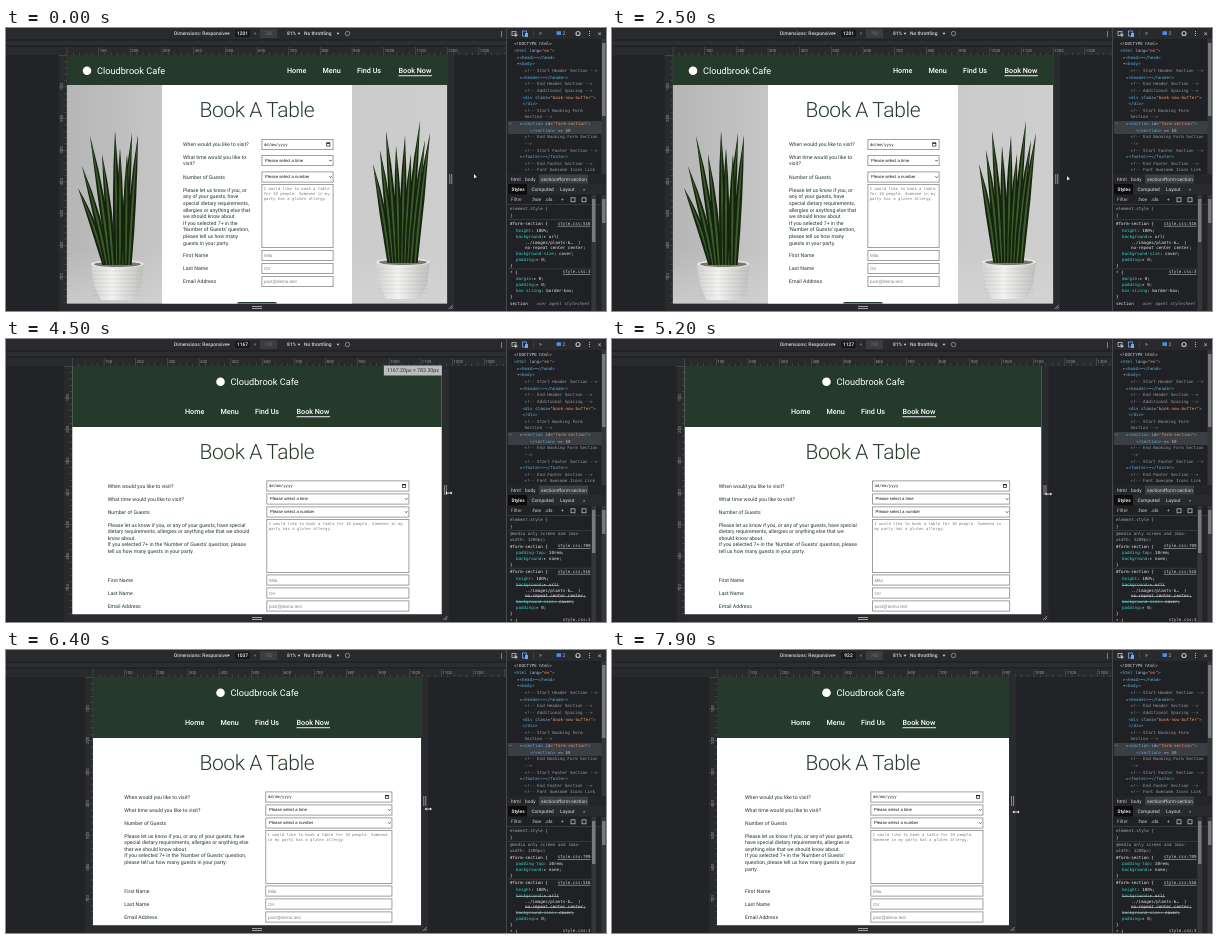
Recreate the animation shown at these times as an HTML page with a canvas. Size 600 px wide and 283 px high, loop 8000 ms.

```html
<!DOCTYPE html>
<html lang="en">
<head>
<meta charset="utf-8">
<title>Responsive booking form</title>
<style>
  html, body { margin: 0; width: 100%; height: 100%; overflow: hidden; background: #202124; }
  canvas { display: block; }
</style>
</head>
<body>
<canvas id="stage" width="600" height="283"></canvas>
<script>
const g = document.getElementById('stage').getContext('2d');
const LOOP = 8000, SCALE = 0.3168, MID = 251, TOP = 27, BOTTOM = 275.5;
const SITE = 'Roboto, sans-serif', UI = 'Roboto, sans-serif';
const ARIAL = '"Liberation Sans", sans-serif', MONO = '"DejaVu Sans Mono", monospace';
const GREEN = '#253a2a', CH = 2.53;

const WIDTHS = [[3600, 1201], [4500, 1167], [5800, 1092], [6400, 1037], [7900, 922], [8000, 915]];
const POINTER_X = [[0, 469], [1400, 464], [3600, 448]];
const POINTER_Y = [[0, 148], [1400, 147], [3600, 153], [4500, 154], [5800, 156], [6400, 159], [7900, 162]];

const NOTE = "Please let us know if you, or any of your guests, have special dietary requirements, " +
  "allergies or anything else that we should know about.\n" +
  "If you selected 7+ in the 'Number of Guests' question, please tell us how many guests in your party.";
const HINT = 'I would like to book a table for 10 people. Someone in my party has a gluten allergy.';

// Piecewise linear value of [time, value] keys
function at(keys, t) {
  if (t <= keys[0][0]) return keys[0][1];
  for (let i = 1; i < keys.length; i++) {
    const [a, u] = keys[i - 1], [b, v] = keys[i];
    if (t <= b) return u + (v - u) * (t - a) / (b - a);
  }
  return keys[keys.length - 1][1];
}

function rect(x, y, w, h, color) {
  g.fillStyle = color;
  g.fillRect(x, y, w, h);
}

function line(color, width, ...pts) {
  g.strokeStyle = color;
  g.lineWidth = width;
  g.beginPath();
  pts.forEach(([x, y]) => g.lineTo(x, y));
  g.stroke();
}

function shape(color, ...pts) {
  g.fillStyle = color;
  g.beginPath();
  pts.forEach(([x, y]) => g.lineTo(x, y));
  g.fill();
}

function oval(x, y, rx, ry, color) {
  g.fillStyle = color;
  g.beginPath();
  g.ellipse(x, y, rx, ry, 0, 0, 7);
  g.fill();
}

// y is the middle of the capitals
function text(s, x, y, size, color, family = SITE, align = 'left', style = '') {
  g.font = `${style} ${size}px ${family}`;
  g.textAlign = align;
  g.fillStyle = color;
  g.fillText(s, x, y + size * 0.35);
}

function wrap(s, limit) {
  return s.split('\n').flatMap(part => {
    const rows = [''];
    for (const word of part.split(' ')) {
      const row = rows[rows.length - 1];
      if (!row) rows[rows.length - 1] = word;
      else if (row.length + 1 + word.length <= limit) rows[rows.length - 1] += ' ' + word;
      else rows.push(word);
    }
    return rows;
  });
}

function chevron(x, y, color, r = 1.2) {
  line(color, 0.8, [x - r, y - r / 2], [x, y + r / 2], [x + r, y - r / 2]);
}

function toolbar(width) {
  rect(0, 0, 501, 283, '#222326');
  rect(0, 0, 501, 11, '#292a2d');
  rect(0, 13, 501, 4, '#2c2d30');
  const grey = '#d4d7da';
  const label = (s, x) => text(s, x, 5.5, 4.9, grey, UI, 'left', '500');
  label('Dimensions: Responsive', 168);
  label('81%', 281);
  label('No throttling', 298);
  [222.5, 293, 332].forEach(x => shape(grey, [x - 1.4, 4.8], [x + 1.4, 4.8], [x, 6.8]));
  rect(228, 1, 17, 9, '#3b3c40');
  rect(228.5, 1.5, 16, 8, '#18191b');
  rect(254, 1, 17, 9, '#3b3c40');
  text(width, 236.5, 5.5, 4.9, '#f1f3f4', UI, 'center', '500');
  text('×', 249, 5.5, 4.7, '#999', UI, 'center');
  text('783', 262.5, 5.5, 4.9, '#6a6c70', UI, 'center');
  g.strokeStyle = '#a9acaf';
  g.lineWidth = 0.7;
  g.beginPath();
  g.arc(341.5, 5.5, 2.2, 0, 7);
  g.stroke();
  [3.5, 5.5, 7.5].forEach(y => rect(495, y, 1, 1, grey));
}

function rulers(left) {
  rect(0, 19, 501, 8, '#292a2c');
  rect(left - 8, TOP, 8, 256, '#292a2c');
  for (let n = 0; left + n * SCALE < 501; n += 20) {
    const x = left + n * SCALE, big = n % 100 === 0;
    rect(x, big ? 19 : 24.5, 0.5, big ? 8 : 2.5, '#5b5d60');
    if (big && n) text(n, x + 1.2, 22.3, 4.2, '#929497', UI);
  }
  for (let n = 0; n < 800; n += 20) {
    const y = TOP + n * SCALE, big = n % 100 === 0;
    rect(left - (big ? 8 : 2.5), y, big ? 8 : 2.5, 0.5, '#5b5d60');
    if (!big || !n) continue;
    g.save();
    g.translate(left - 4.8, y - 1);
    g.rotate(-Math.PI / 2);
    text(n, -1, 0, 4.2, '#929497', UI, 'center');
    g.restore();
  }
}

function handles(right) {
  rect(right, TOP, 7, 256, '#2a2b2e');
  rect(MID * 2 - right, BOTTOM, (right - MID) * 2 + 7, 8, '#2a2b2e');
  [2, 4].forEach(d => rect(right + d, 146, 1, 10, '#8c8e91'));
  [278, 280].forEach(y => rect(MID - 5, y, 10, 1, '#a0a2a5'));
  line('#a0a2a5', 0.8, [right + 1.5, 281], [right + 5.5, 277]);
  line('#a0a2a5', 0.8, [right + 3.5, 281], [right + 5.5, 279]);
}

function leaf(x, y, tx, ty, w) {
  const bend = (tx - x) * 0.35, my = (y + ty) / 2;
  const blade = (half, color) => {
    g.fillStyle = color;
    g.beginPath();
    g.moveTo(x - half / 2, y);
    g.quadraticCurveTo(x + bend - half, my, tx, ty);
    g.quadraticCurveTo(x + bend + half, my, x + half / 2, y);
    g.fill();
  };
  blade(w, '#15240f');
  blade(w * 0.3, '#3d5c2a');
}

function pot(x, y, w, h) {
  const fill = g.createLinearGradient(x, 0, x + w, 0);
  fill.addColorStop(0, '#d2d2d0');
  fill.addColorStop(0.4, '#f2f2f0');
  fill.addColorStop(1, '#bebebc');
  shape(fill, [x, y], [x + w, y], [x + w - 3, y + h * 0.6], [x + w - 10, y + h],
    [x + 10, y + h], [x + 3, y + h * 0.6]);
  for (let d = 7; d < h - 3; d += 4) line('rgba(130,130,130,.2)', 0.6, [x + 2, y + d], [x + w - 2, y + d]);
  oval(x + w / 2, y, w / 2, 4, '#e6e6e4');
  oval(x + w / 2, y + 0.3, w / 2 - 3, 2.6, '#77776e');
}

function plants(left, right) {
  const wall = g.createLinearGradient(left, 0, right, 0);
  wall.addColorStop(0, '#b6b6b6');
  wall.addColorStop(0.25, '#c6c6c6');
  wall.addColorStop(1, '#cecece');
  rect(left, 57, right - left, BOTTOM - 57, wall);
  const table = g.createLinearGradient(0, 222, 0, BOTTOM);
  table.addColorStop(0, 'rgba(215,215,215,0)');
  table.addColorStop(1, 'rgba(215,215,215,.6)');
  rect(left, 222, right - left, 54, table);
  pot(85, 236, 53, 36);
  [[99, 72, 160], [101, 76, 138], [104, 84, 108], [107, 96, 126], [111, 109, 103],
   [114, 114, 120], [117, 126, 105], [120, 121, 126], [123, 132, 107]]
    .forEach(([x, tx, ty]) => leaf(x, 237, tx, ty, 5.2));
  pot(370, 234, 54, 37);
  [[384, 367, 136], [387, 374, 122], [390, 380, 103], [393, 390, 118], [396, 399, 108],
   [399, 405, 126], [402, 414, 93], [405, 419, 112], [409, 424, 105]]
    .forEach(([x, tx, ty]) => leaf(x, 235, tx, ty, 5.2));
}

function nav(logoX, logoY, linkX, linkY) {
  oval(logoX, logoY, 4.3, 4.3, '#fff');
  text('Cloudbrook Cafe', logoX + 10, logoY, 9.2, '#fff');
  ['Home', 'Menu', 'Find Us', 'Book Now'].forEach((s, i) =>
    text(s, linkX + [0, 35.5, 70, 111.5][i], linkY, 7.2, '#fff', SITE, 'left', '500'));
  rect(linkX + 111.5, linkY + 4.6, 33.5, 0.9, '#fff');
}

function form(wide, left, x, right) {
  const w = right - x;
  const y = wide ? [116.5, 132.5, 149, 227.5, 240.5, 253.5] : [147, 160, 173, 241, 254, 267];
  const area = wide ? [156, 64] : [180, 54];
  const ink = '#24382a';
  const label = (s, ly) => text(s, left, ly, 5.18, ink);
  const box = (by, h) => {
    rect(x, by, w, h, '#858a86');
    rect(x + 0.8, by + 0.8, w - 1.6, h - 1.6, '#fff');
  };

  label('When would you like to visit?', y[0]);
  if (wide) {
    label('What time would you like to', 129);
    label('visit?', 135.5);
  } else label('What time would you like to visit?', y[1]);
  label('Number of Guests', y[2]);
  const note = wide ? wrap(NOTE.replace('many ', 'many\n'), 31) : wrap(NOTE, Math.floor((244.5 - left) / 2.2));
  note.forEach((s, i) => label(s, (wide ? 162 : 185.7) + i * 6.6));

  y.forEach(cy => box(cy - 5.5, 11));
  text('dd/mm/yyyy', x + 2.5, y[0], 3.95, '#222', MONO);
  g.strokeStyle = '#222';
  g.lineWidth = 0.7;
  g.strokeRect(right - 6.8, y[0] - 1.6, 3.2, 3.2);
  rect(right - 7, y[0] - 1.9, 3.4, 1.2, '#222');
  ['Please select a time', 'Please select a number'].forEach((s, i) => {
    text(s, x + 3.5, y[i + 1], 4.25, '#111', ARIAL);
    chevron(right - 3, y[i + 1], '#222');
  });
  ['First Name', 'Last Name', 'Email Address'].forEach((s, i) => {
    label(s, y[i + 3]);
    text(['Mila', 'Orr', 'post@demo.test'][i], x + 2.5, y[i + 3], 4.5, '#808080', ARIAL);
  });
  box(...area);
  wrap(HINT, Math.floor((w - 4) / 2.36)).forEach((s, i) =>
    text(s, x + 2.2, area[0] + 5 + i * 5, 3.92, '#7c7c7c', MONO));
}

function page(wide, left, right) {
  const w = right - left;
  g.save();
  g.beginPath();
  g.rect(left, TOP, w, BOTTOM - TOP);
  g.clip();
  rect(left, TOP, w, BOTTOM - TOP, '#fff');
  if (wide) {
    plants(left, right);
    rect(156, 57, 190, 219, '#fff');
    rect(left, TOP, w, 30, GREEN);
    nav(81, 42.7, 281, 42.7);
    form(true, 177, 255.5, 327.5);
    g.fillStyle = GREEN;
    g.beginPath();
    g.roundRect(231, 274, 40, 10, 2);
    g.fill();
  } else {
    rect(left, TOP, w, 61, GREEN);
    nav(214.5, 42.7, 179, 72.7);
    form(false, left + w * 0.096, MID + w * 0.0255, right - w * 0.088);
  }
  g.letterSpacing = '-0.4px';
  text('Book A Table', MID - 0.2, wide ? 81.8 : 112.3, 21, GREEN, SITE, 'center', '300');
  g.letterSpacing = '0px';
  g.restore();
}

const MARKUP = [
  [508, '<!DOCTYPE html>'], [508, '<html lang="en">'], [511, '▸<head>⋯</head>'], [511, '▾<body>'],
  [518.5, '<!-- Start Header Section -->'], [514, '▸<header>⋯</header>'],
  [518.5, '<!-- End Header Section -->'], [518.5, '<!-- Additional Spacing -->'],
  [516.5, '<div class="book-now-buffer">'], [516.5, '</div>'],
  [518.5, '<!-- Start Booking Form'], [518.5, 'Section -->'],
  [514, '▸<section id="form-section">'], [524, '</section> == $0'],
  [518.5, '<!-- End Booking Form Section'], [518.5, '-->'],
  [518.5, '<!-- Start Footer Section -->'], [514, '▸<footer>⋯</footer>'],
  [518.5, '<!-- End Footer Section -->'], [518.5, '<!-- Font Awesome Icons Link']
];

function code(s, x, y, color, style) {
  text(s, x, y, 4.2, color, MONO, 'left', style);
}

function markup() {
  rect(502, 93, 94, 13, '#3b3e43');
  text('⋯', 503, 96, 4.2, '#aaa', MONO);
  MARKUP.forEach(([x, s], i) => {
    const y = 16 + i * 6.63;
    if (/--|^Section/.test(s)) return code(s, x, y, '#989a9c');
    if (/DOCTYPE/.test(s)) return code(s, x, y, '#d8dadc');
    for (const m of s.matchAll(/"[^"]*"|\w+(?==)|[▸▾⋯=]| ==.*|[^"▸▾⋯= ]+/g)) {
      const p = m[0];
      const color = p[0] === '"' ? '#f29766' : /^[▸▾⋯=]| ==/.test(p) ? '#b5b8bb'
        : s[m.index + p.length] === '=' ? '#9bbbdc' : '#5db0d7';
      code(p, x + m.index * CH, y, color);
    }
  });
}

// Rows: [y, text, flag]; flag is a link label or 'x' for an overridden rule
const BASE_RULE = [[0, '#form-section {', 'style.css:516'], [6.5, ' height: 100%;']];
const shift = (dy, rows) => rows.map(([y, ...rest]) => [y + dy, ...rest]);
const STYLES_WIDE = [
  ...shift(196, BASE_RULE), [209, ' background:▸ url('], [214.7, '   ../images/plants-b…  )'],
  [220, '   no-repeat center center;'], [226, ' background-size: cover;'], [231.7, ' padding:▸ 0;'], [237.5, '}'],
  [244.5, '* {', 'style.css:3'], [251, ' margin:▸ 0;'], [257, ' padding:▸ 0;'],
  [263, ' box-sizing: border-box;'], [269, '}'], [276, 'section']
];
const STYLES_NARROW = [
  [195, '@media only screen and (max-'], [201, 'width: 1200px)'],
  [207.5, '#form-section {', 'style.css:709'], [213.7, ' padding-top: 10rem;'], [219.5, ' background:▸ none;'], [225.5, '}'],
  ...shift(233, BASE_RULE), [246, ' background:▸ url(', 'x'], [251.5, '   ../images/plants-b…  )'],
  [257, '   no-repeat center center;', 'x'], [262.5, ' background-size: cover;', 'x'],
  [268.5, ' padding:▸ 0;'], [275, '}'], [281.5, '* {', 'style.css:3']
];

function styles(wide) {
  code('element.style {', 504, 181, '#a9acaf');
  code('}', 504, 187.7, '#c8cacc');
  rect(502, 191.5, 84, 0.5, '#4a4c50');
  rect(502, wide ? 240.7 : 228.9, 84, 0.5, '#4a4c50');
  for (const [y, s, flag] of wide ? STYLES_WIDE : STYLES_NARROW) {
    const body = s.trimStart(), indent = s.length - body.length;
    const x = 504 + (indent === 3 ? 15 : indent * 6);
    const cut = indent === 1 ? body.indexOf(':') : 0;
    code(body.slice(0, cut), x, y, '#35d4c7');
    code(body.slice(cut), x + cut * CH, y, s[0] === '@' || s[0] === 'w' ? '#a0a3a6' : '#e8eaed');
    if (flag === 'x') rect(x, y, body.length * CH, 0.6, '#c8cacc');
    else if (flag) {
      text(flag, 584.5, y - 0.5, 4.2, '#d0d3d6', MONO, 'right');
      rect(584.5 - flag.length * CH, y + 1.9, flag.length * CH, 0.5, '#d0d3d6');
    }
  }
  if (wide) text('user agent stylesheet', 583.5, 276, 4.2, '#9a9da0', MONO, 'right', 'italic');
}

function scrollbar(x, top, bottom, thumbTop, thumbEnd) {
  rect(x, top, 4.5, bottom - top, '#35363a');
  rect(x + 0.5, thumbTop, 3.5, thumbEnd - thumbTop, '#77797c');
}

function inspector(wide) {
  const grey = '#b9bcbf';
  rect(500, 0, 100, 283, '#202124');
  rect(500, 0, 1, 283, '#46484c');
  rect(501, 0, 99, 11, '#292a2d');
  g.lineWidth = 0.8;
  g.strokeStyle = grey;
  g.strokeRect(506, 3.5, 4, 4);
  shape(grey, [508, 5], [512, 7], [509.5, 9]);
  g.strokeStyle = '#6ea8f0';
  g.strokeRect(516.5, 3, 4, 5);
  rect(519, 5, 3, 4, '#6ea8f0');
  rect(527, 2.5, 0.5, 6, '#55585c');
  text('»', 534.5, 5.3, 6, grey, UI, 'center');
  rect(550.5, 3.3, 4.5, 3.6, '#4f8fe8');
  text('2', 556.5, 5.3, 4.9, grey, UI);
  g.beginPath();
  g.arc(572, 5.5, 2, 0, 7);
  g.lineWidth = 1.2;
  g.strokeStyle = grey;
  g.stroke();
  [3, 5, 7].forEach(y => rect(583, y, 1, 1, grey));
  text('×', 593.5, 5.3, 7, grey, UI, 'center');

  markup();
  scrollbar(595.5, 11, 146, 15, 88);

  rect(501, 146, 99, 10, '#242528');
  rect(533, 146.5, 49, 9, '#3b3e43');
  [['html', 505], ['body', 519], ['section#form-section', 535]].forEach(([s, x]) =>
    text(s, x, 151, 4.8, '#d4d7da', UI));
  rect(501, 156, 99, 10.5, '#292a2d');
  rect(502, 156, 19, 10.5, '#0c0c0d');
  [['Styles', 505.5, '#fff'], ['Computed', 525.5, grey], ['Layout', 554, grey], ['»', 577, grey]]
    .forEach(([s, x, c]) => text(s, x, 161, 4.8, c, UI, 'left', '500'));
  [['Filter', 505, '#95989b'], [':hov', 526, grey], ['.cls', 539, grey], ['+', 555, grey]]
    .forEach(([s, x, c]) => text(s, x, 171.8, 4.8, c, UI, 'left', '500'));
  g.lineWidth = 0.8;
  g.strokeStyle = grey;
  [565, 576].forEach(x => g.strokeRect(x, 169.8, 4, 4));
  rect(501, 176.5, 99, 0.5, '#4a4c50');
  styles(wide);
  rect(586, 177, 14, 106, '#242528');
  scrollbar(585.5, 167, 283, 171, 214);
  scrollbar(595.5, 167, 283, 171, 195);
}

function sizeTag(width, right) {
  rect(right - 58, 26.5, 58, 10, '#b9beba');
  text(`${width}.20px × 783.20px`, right - 29, 31.5, 5.3, '#333', UI, 'center');
}

function pointer(t, right) {
  const y = at(POINTER_Y, t);
  if (t < 3400) {
    const x = at(POINTER_X, t);
    shape('#fff', [x - 1, y - 2], [x - 1, y + 2.5], [x + 0.2, y + 1.6], [x + 2, y + 1.3]);
    return;
  }
  const x = right + 7;
  line('#fff', 0.8, [x - 2, y], [x + 2, y]);
  [-1, 1].forEach(d => shape('#fff', [x + 3.6 * d, y], [x + 1.8 * d, y - 1.5], [x + 1.8 * d, y + 1.5]));
}

function draw(now) {
  const t = now % LOOP;
  const width = Math.round(at(WIDTHS, t));
  const half = width * SCALE / 2, left = MID - half, right = MID + half;
  const wide = width > 1200;
  g.textRendering = 'geometricPrecision';
  toolbar(width);
  rulers(left);
  handles(right);
  page(wide, left, right);
  if (!wide && t < 4900) sizeTag(width, right);
  inspector(wide);
  pointer(t, right);
  requestAnimationFrame(draw);
}
requestAnimationFrame(draw);
</script>
</body>
</html>
```
